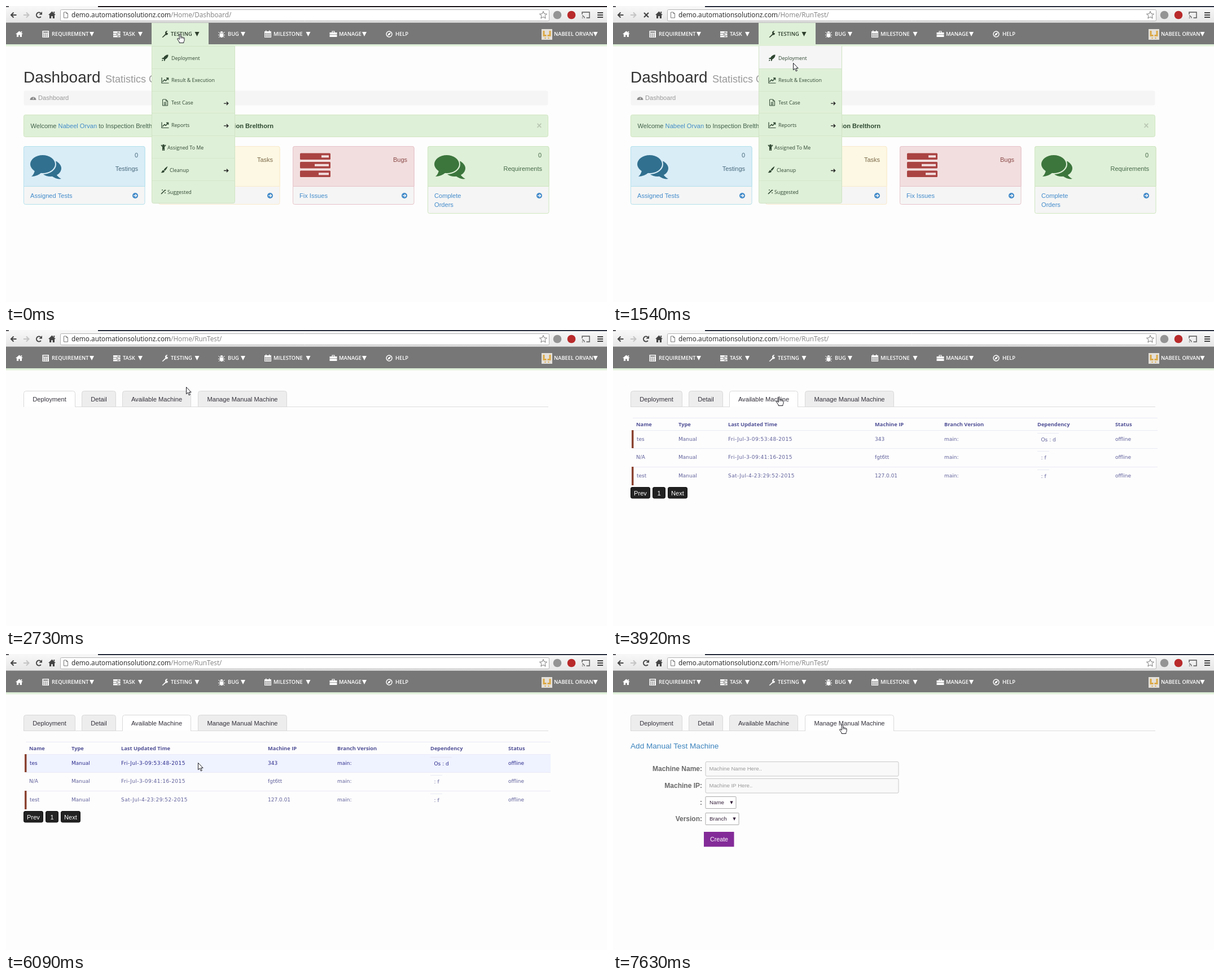
Recreate the animation shown at these times as an HTML page with a canvas. Size 1065 by 526 pixels, loop 8000 ms.

```html
<!DOCTYPE html>
<html lang="en">
<head>
<meta charset="utf-8">
<title>Dashboard walkthrough</title>
<style>
html, body { margin: 0; width: 100%; height: 100%; overflow: hidden; background: #fdfdfd; }
canvas { display: block; width: 1065px; height: 526px; }
</style>
</head>
<body>
<canvas id="stage" width="1065" height="526"></canvas>
<script>
const c = document.getElementById('stage').getContext('2d');
const LOOP = 8000, STEP = 70;
const SANS = 'px "Liberation Sans", sans-serif';
const UI = 'px "Open Sans", sans-serif';
const GRID = 'px "DejaVu Sans", sans-serif';
const USER = 'Nabeel Orvan', BRAND = 'Inspection Brelthorn';
const GREEN = '#dff0d8', LINK = '#428bca', PAGE = '#fdfdfd';

// Pointer tip: time, x, y
const POINTER = [
  [0, 308, 49], [70, 308, 49], [210, 312, 68], [420, 320, 124], [560, 322, 118],
  [770, 320, 101], [1330, 320, 101], [1400, 319, 101], [2870, 319, 101],
  [2940, 317, 101], [3010, 317, 101], [3080, 308, 107], [3220, 228, 114],
  [3360, 294, 118], [4620, 294, 118], [4760, 285, 121], [5180, 345, 151],
  [5250, 345, 151], [5320, 330, 190], [5390, 307, 242], [5460, 291, 273.5],
  [5530, 297, 262], [5670, 322, 226], [5740, 322, 226], [6370, 355, 166],
  [6510, 366, 124], [6580, 360, 151], [6650, 415, 138], [6720, 465, 121],
  [6790, 405, 130], [6860, 405, 130], [6930, 406, 125], [8000, 406, 125]
];

function text(s, x, y, font, color, align = 'left') {
  c.font = font;
  c.fillStyle = color;
  c.textAlign = align;
  c.fillText(s, x, y);
}
function rect(x, y, w, h, color) {
  c.fillStyle = color;
  c.fillRect(x, y, w, h);
}
function box(x, y, w, h, r, fill, line) {
  c.beginPath();
  c.roundRect(x + .5, y + .5, w - 1, h - 1, r);
  c.fillStyle = fill;
  c.fill();
  if (line) { c.strokeStyle = line; c.lineWidth = 1; c.stroke(); }
}
function disc(x, y, r, color) {
  c.beginPath();
  c.arc(x, y, r, 0, 7);
  c.fillStyle = color;
  c.fill();
}
// Draws path data around x, y: filled, or stroked when a width is given
function icon(d, x, y, color, width = 0) {
  const p = new Path2D(d);
  c.save();
  c.translate(x, y);
  c.lineWidth = width;
  c.fillStyle = c.strokeStyle = color;
  width ? c.stroke(p) : c.fill(p, 'evenodd');
  c.restore();
}

function pointerAt(t) {
  const i = Math.max(1, POINTER.findIndex(k => k[0] >= t));
  const [t0, x0, y0] = POINTER[i - 1], [t1, x1, y1] = POINTER[i];
  const f = (t - t0) / (t1 - t0);
  return { x: x0 + (x1 - x0) * f, y: y0 + (y1 - y0) * f };
}

function browser(t) {
  const bar = c.createLinearGradient(0, 2, 0, 30);
  bar.addColorStop(0, '#f7f7f7');
  bar.addColorStop(1, '#e6e6e6');
  rect(0, 0, 1065, 30, bar);
  rect(163, 0, 902, 2, t < 1120 ? '#211b20' : '#2b3040');
  rect(0, 0, 5, 2, '#55565c');
  rect(0, 29, 1065, 1, '#b4b4b4');
  icon('M5 0H-4M0-4.5L-4.5 0L0 4.5', 13.5, 16, '#444', 2);
  icon('M-5 0H4M0-4.5L4.5 0L0 4.5', 36, 16, '#c4c4c4', 2);
  if (t >= 1330 && t < 2730) icon('M-4-4L4 4M4-4L-4 4', 59, 16, '#444', 2.2);
  else {
    icon('M3.4 3A4.5 4.5 0 1 1 2.8-3.5', 58.5, 16, '#444', 2);
    icon('M5.5-6V-.5H0Z', 58.5, 16, '#444');
  }
  icon('M0-6.5L6.5 0H4.5V6H1.3V2H-1.3V6H-4.5V0H-6.5ZM2.8-6H4.7V-2.5L2.8-4.3Z', 81.5, 16, '#444');
  box(96, 6, 867, 21, 2, '#fff', '#b2b2b2');
  icon('M-3.5-5H1L3.5-2.5V5H-3.5ZM1-5V-2.5H3.5', 106, 16, '#777', 1);
  const host = 'demo.automationsolutionz.com';
  text(host, 116, 20, '11.8' + UI, '#222');
  const x = 116 + c.measureText(host).width;
  text(t < 1540 ? '/Home/Dashboard/' : '/Home/RunTest/', x, 20, '11.8' + UI, '#808080');
  icon('M0-6.5L1.9-2.1L6.5-1.8L3 1.3L4.1 6L0 3.4L-4.1 6L-3 1.3L-6.5-1.8L-1.9-2.1Z', 952, 16, '#777', 1);
  disc(977, 16, 7.3, '#949494');
  disc(1002, 16, 7.3, '#b92a2b');
  icon('M-6.5-1V-5H6.5V5H1M-6.5 1.5A4 4 0 0 1-2.5 5.5M-6.5 4.5L-5.5 5.5', 1027.5, 16, '#555', 1.4);
  for (let i = 0; i < 3; i++) rect(1048, 11 + i * 4, 10, 2, '#444');
}

const WRENCH = 'M-5 5.5L1-.5A3.4 3.4 0 0 1 5-5.5L2.8-3.3L3.2-2.6L5.6-1.2A3.4 3.4 0 0 1 1.6 1.5L-3.5 6Z';
function caret(x, color) { icon('M-4-4H4L0 4Z', x, 50, color); }

function nav(open) {
  rect(0, 30, 1065, 38, '#777');
  rect(0, 68, 1065, 3.5, GREEN);
  if (open) rect(258, 30, 101, 42, GREEN);
  const dark = '#2e3f2e';
  const items = [['REQUIREMENT', 81, 152], ['TASK', 207, 238], ['TESTING', 292, 338.5],
    ['BUG', 393, 420], ['MILESTONE', 474, 535.5], ['MANAGE', 590, 635], ['HELP', 690]];
  for (const [s, x, cx] of items) {
    const color = open && s === 'TESTING' ? dark : '#fff';
    text(s, x, 53, '600 9.3' + UI, color);
    if (cx) caret(cx, color);
  }
  icon('M0-5.5L6.5 0H4.5V5H1.3V1.5H-1.3V5H-4.5V0H-6.5ZM3-5H4.7V-2L3-3.5Z', 23.5, 50, '#fff');
  // calculator
  rect(64.5, 44, 11.5, 12, '#fff');
  rect(66, 45.5, 8.5, 2, '#777');
  for (let i = 0; i < 9; i++) rect(66 + i % 3 * 3, 49 + (i / 3 | 0) * 2.3, 2, 1.3, '#777');
  // task list
  for (let i = 0; i < 3; i++) {
    rect(190, 45 + i * 3.8, 12.5, 2.9, '#fff');
    rect(197 - i % 2 * 2, 46 + i * 3.8, 4, 1, '#777');
  }
  icon(WRENCH, 281.5, 50, open ? dark : '#fff');
  icon('M-3-1.5H3V3A3 3 0 0 1-3 3ZM-2.5-2.3A2.5 2.7 0 0 1 2.5-2.3Z', 382, 50, '#fff');
  icon('M-5.5-4L-3-1M5.5-4L3-1M-6 1.5H6M-5 6L-2.5 3M5 6L2.5 3', 382, 50, '#fff', 1);
  // calendar
  rect(458, 45, 12, 11, '#fff');
  rect(460, 43.5, 1.5, 3, '#fff');
  rect(466, 43.5, 1.5, 3, '#fff');
  for (let i = 0; i < 12; i++) rect(459 + i % 4 * 2.7, 48.3 + (i / 4 | 0) * 2.5, 1.8, 1.6, '#777');
  icon('M-6.5-3H6.5V5H-6.5ZM-2.5-3V-5.5H2.5V-3H1.3V-4.4H-1.3V-3ZM-6.5.5V1.3H6.5V.5Z', 580, 50, '#fff');
  icon('M5 0A5 5 0 1 1-5 0A5 5 0 1 1 5 0', 679, 50, '#fff', 1.4);
  icon('M3-3L1.3 1.3L-3 3L-1.3-1.3Z', 679, 50, '#fff');
  // avatar
  rect(949, 41, 19, 19, '#e4e0da');
  icon('M-7-6H-4V1H-1V4H-7ZM7-6H4V1H1V4H7ZM-4 6H-2V8H-4ZM4 6H2V8H4Z', 958.5, 50, '#dba946');
  text(USER.toUpperCase(), 971, 53, '600 9.3' + UI, '#fff');
  caret(1044.5, '#fff');
}

function goArrow(x, y) {
  disc(x, y, 5, LINK);
  icon('M-3 0H2M0-2.5L2.5 0L0 2.5', x, y, '#f5f5f5', 1.4);
}
function chat(x, y, color, bg) {
  c.beginPath();
  c.ellipse(x + 36, y + 23.5, 19, 14.5, 0, 0, 7);
  c.fillStyle = color;
  c.fill();
  icon('M46 34Q50 40 55 42Q47 44 38 37Z', x, y, color);
  c.beginPath();
  c.ellipse(x + 22, y + 16, 22, 16, 0, 0, 7);
  c.lineWidth = 4;
  c.strokeStyle = bg;
  c.stroke();
  c.fillStyle = color;
  c.fill();
  icon('M8 27Q7 34 2 38Q12 38 20 31Z', x, y, color);
}
function card(x, h, bg, line, label, foot, color, labelY) {
  box(x, 249, 215.5, h, 3, '#f5f5f5', line);
  box(x, 249, 215.5, 72, [3, 3, 0, 0], bg, line);
  text(label, x + 203, labelY, '11' + SANS, color, 'right');
  foot.forEach((s, i) => text(s, x + 12, 341 + i * 16, '11.1' + SANS, LINK));
  goArrow(x + 198, 337);
}

function dashboard(p) {
  text('Dashboard', 31, 136, '27.9' + SANS, '#333');
  text('Statistics Overview', 176, 136, '18' + SANS, '#999');
  box(31, 150, 930, 27, 3, '#f5f5f5');
  icon('M-5.5 4A5.5 5.5 0 1 1 5.5 4ZM-.6 2.5L1.5-2L.8 3Z', 48, 163, '#8c8c8c');
  text('Dashboard', 57, 167, '11.1' + SANS, '#999');

  box(31, 193, 930, 40, 3, GREEN, '#d0e6c0');
  const font = '11.1' + SANS, ink = '#41604a';
  let x = 43.5;
  for (const [s, color] of [['Welcome ', ink], [USER, LINK], [' to ' + BRAND, ink]]) {
    text(s, x, 217, font, color);
    x += c.measureText(s).width;
  }
  c.save();
  c.beginPath();
  c.rect(400, 193, 200, 40);
  c.clip();
  text(BRAND, 474, 217, 'bold ' + font, '#2f4a32', 'right');
  c.restore();
  text('×', 945, 218, 'bold 16' + SANS, '#b9c8b3', 'center');

  card(31, 104, '#d9edf7', '#b4e1ec', 'Testings', ['Assigned Tests'], '#4a6a7d', 293);
  card(270, 104, '#fcf8e3', '#faebcc', 'Tasks', ['View Tasks'], '#7d6a4b', 277);
  card(508, 104, '#f2dede', '#e6c3c9', 'Bugs', ['Fix Issues'], '#8b4a49', 277);
  card(747, 120, GREEN, '#cfe6bf', 'Requirements', ['Complete', 'Orders'], '#466a4a', 293);
  text('0', 234, 269, '11' + SANS, '#4a6a7d', 'right');
  text('0', 949, 269, '11' + SANS, '#466a4a', 'right');
  chat(43, 265, '#31708f', '#d9edf7');
  chat(759, 265, '#3c763d', GREEN);
  [13, 25, 18].forEach((w, i) => {
    box(520.5, 261 + i * 15.5, 55, 12.5, 1.5, '#a94442');
    rect(572 - w, 265.3 + i * 15.5, w, 4, '#f2dede');
  });
  menu(p);
}

function menu(p) {
  box(258, 71, 148, 280, [0, 0, 3, 3], GREEN, '#cfe3c4');
  const hover = Math.floor((p.y - 71) / 40);
  if (hover >= 0) rect(259, 71 + hover * 40, 146, 40, '#f5f5f5');
  const labels = [['Deployment', 293], ['Result & Execution', 293], ['Test Case', 293],
    ['Reports', 293], ['Assigned To Me', 286], ['Cleanup', 290], ['Suggested', 286]];
  const ink = '#2f4732';
  labels.forEach(([s, x], i) => {
    const y = 92 + i * 39.8;
    if (i) rect(259, Math.round(y - 21), 146, 1, '#d4e8ca');
    text(s, x, y + 3.5, '8.9' + UI, ink);
    if (i === 2 || i === 3 || i === 5)
      icon('M-4 0H3.5M.8-2.8L3.7 0L.8 2.8', 390, y + 1.5, '#222', 1.4);
  });
  icon('M5.5-5.5Q6 0 0 3V5L-2 6V3L-3 2H-6L-5 0H-3Q0-5.5 5.5-5.5ZM-5 3L-3 4.5L-6 6Z', 282, 92, ink);
  for (const y of [132, 211.5]) {
    icon('M-6-5V5H6.5', 282, y, ink, 1.2);
    icon('M-4.5 2.5L-1-1L1 1L5-3.5M2-4H5.5V-.5', 282, y, ink, 1.5);
  }
  icon('M-4-5.5H1.5L4.5-2.5V5.5H-4.5V-5.5M1.5-5.5V-2.5H4.5M-2.5-.2H2.5M-2.5 1.8H2.5M-2.5 3.8H2.5', 282, 171.5, ink, 1);
  disc(279, 247.5, 1.8, ink);
  icon('M-4-4L-1.5-1.2H1.5L4-4M0-1V3M-1.2 0V6M1.2 0V6', 279, 251, ink, 1.7);
  icon('M6-6Q3-5-1 0L1 2Q5-2 6-6ZM-1.5.7L.5 2.6Q0 6-6 5Q-4 4-3.7 2Q-3 .7-1.5.7Z', 280.5, 291, ink);
  icon('M-4 4L2-2', 279, 330, ink, 1.6);
  icon('M3-4V-1M1.5-2.5H4.5M-2-4V-2M-3-3H-1M3 1V3M2 2H4', 279, 330, ink, .8);
}

function loading(t) {
  for (let i = 0; i < 5; i++) {
    const age = t - 2030 - i * 100;
    const rise = age > 0 ? Math.max(0, 1 - Math.abs(age % 1200 - 240) / 240) : 0;
    const h = 25 * (.4 + .6 * rise);
    rect(516 + i * 7, 120 - h / 2, 5, h, '#333');
  }
  text('Loading', 532.5, 229, 'bold 18.3' + SANS, '#2e2a2e', 'center');
  text(BRAND, 533, 259, 'bold 10.7' + SANS, '#a0a0a0', 'center');
}

const TABS = [['Deployment', 31, 92], ['Detail', 134, 61],
  ['Available Machine', 206, 122], ['Manage Manual Machine', 340, 158]];
function tabs(active, pressed) {
  rect(31, 136, 930, 1, '#ddd');
  TABS.forEach(([s, x, w], i) => {
    const on = i === active;
    box(x, 108, w, 29, [4, 4, 0, 0], on || i === pressed ? '#fff' : '#ededed', '#d9d9d9');
    if (on) rect(x + 1, 136, w - 2, 2, PAGE);
    text(s, x + w / 2, 126.5, '11.15' + SANS, '#33303a', 'center');
  });
}

const COLS = [41, 116, 204, 464, 587, 752, 890];
const ROWS = [
  ['Name', 'Type', 'Last Updated Time', 'Machine IP', 'Branch Version', 'Dependency', 'Status'],
  ['tes', 'Manual', 'Fri-Jul-3-09:53:48-2015', '343', 'main:', 'Os : d', 'offline'],
  ['N/A', 'Manual', 'Fri-Jul-3-09:41:16-2015', 'fgt6tt', 'main:', ': f', 'offline'],
  ['test', 'Manual', 'Sat-Jul-4-23:29:52-2015', '127.0.01', 'main:', ': f', 'offline']
];
function table(p) {
  const tops = [156, 177.5, 210.3, 243, 275.5];
  ROWS.forEach((row, r) => {
    const y = Math.round(tops[r]), h = Math.round(tops[r + 1]) - y;
    const hot = p.y >= tops[r] && p.y < tops[r + 1];
    if (hot) rect(35, y, 930, h, '#eff2ff');
    rect(35, y, 930, 1, '#e9eaf6');
    if (r % 2) rect(33, y, 3.5, h, '#8b4331');
    row.forEach((s, i) => {
      const dep = r > 0 && i === 5;
      const x = COLS[i] + (dep ? 6.5 : 0) + (i === 0 && r % 2 ? 1 : 0);
      const color = r ? (hot ? '#2a2a8c' : '#60609c') : (hot ? '#1c1c8c' : '#4f4f96');
      c.letterSpacing = r && i === 2 ? '0.42px' : '0px';
      text(s, x, y + (r ? 19 : 14.5) + (dep ? 1 : 0), r ? '9' + GRID : 'bold 9.3' + UI, color);
      if (dep) rect(752, y + 5, r === 1 ? 38 : 21, 1, '#e8eaf4');
    });
    c.letterSpacing = '0px';
  });
  for (const [s, x, w] of [['Prev', 31, 35], ['1', 70, 23], ['Next', 97, 35]]) {
    box(x, 279, w, 20.5, 2.5, '#222', '#111');
    text(s, x + w / 2, 293.5, '11.1' + SANS, '#fff', 'center');
  }
}

function form() {
  text('Add Manual Test Machine', 31, 167.5, '13.6' + SANS, '#3b83bd');
  ['Machine Name:', 'Machine IP:', ':', 'Version:'].forEach((s, i) =>
    text(s, 158, 208.3 + i * 29.7, 'bold 12' + SANS, '#686868', 'right'));
  ['Machine Name Here..', 'Machine IP Here..'].forEach((s, i) => {
    box(163.5, 191 + i * 30, 343, 26.5, 2, '#f9f9f9', '#c8c8c8');
    text(s, 170.5, 207.3 + i * 30, '9.6' + SANS, '#999');
  });
  [['Name', 55], ['Branch', 60]].forEach(([s, w], i) => {
    const y = 253 + i * 29.5 | 0;
    box(163.5, y, w, 22, 1, '#fff', '#aaa');
    text(s, 171, y + 14.3, '9.7' + SANS, '#35203a');
    icon('M-2.7-2.5H2.7L0 3Z', 155 + w, y + 11, '#35203a');
  });
  rect(161, 316, 53.5, 26.5, '#832b98');
  text('Create', 188, 333, '10.7' + SANS, '#fff', 'center');
}

function pointer(p, hand) {
  const x = Math.round(p.x) + .5, y = Math.round(p.y) + .5;
  const d = hand
    ? 'M-1.3 1Q0-.8 1.3 1V5.5Q2.6 4.6 3.6 6Q5 5.2 5.8 6.6Q7.6 6 7.6 8V11Q7.6 13 6.4 14V16H-1.4V14.5L-4.8 9.5Q-5 7.5-3 8.2L-1.3 10Z'
    : 'M0 0V12.2L2.8 9.6L4.8 14.4L6.8 13.5L4.8 9H8.6Z';
  icon(d, x, y, '#fff');
  icon(d, x, y, '#1c1c24', 1);
  if (hand) icon('M1.3 5V8.5M3.6 6V8.5M5.8 7V9', x, y, '#1c1c24', .8);
}

function draw(now) {
  const time = now % LOOP;
  const t = Math.floor(time / STEP) * STEP;
  const p = pointerAt(t);
  rect(0, 0, 1065, 526, PAGE);
  browser(t);
  let hand = t < 1400;
  if (t < 2030) {
    nav(true);
    dashboard(p);
  } else if (t < 2590) {
    loading(t);
  } else {
    nav(false);
    const active = t < 3920 ? 0 : t < 7630 ? 2 : 3;
    tabs(active, t >= 7420 ? 3 : t >= 3710 ? 2 : -1);
    if (active === 2) table(p);
    if (active === 3) form();
    hand = p.y >= 107 && p.y < 137 && TABS.some(([, x, w]) => p.x >= x && p.x < x + w);
  }
  pointer(p, hand);
}

const start = performance.now();
function frame() {
  draw(performance.now() - start);
  requestAnimationFrame(frame);
}
frame();
</script>
</body>
</html>
```
